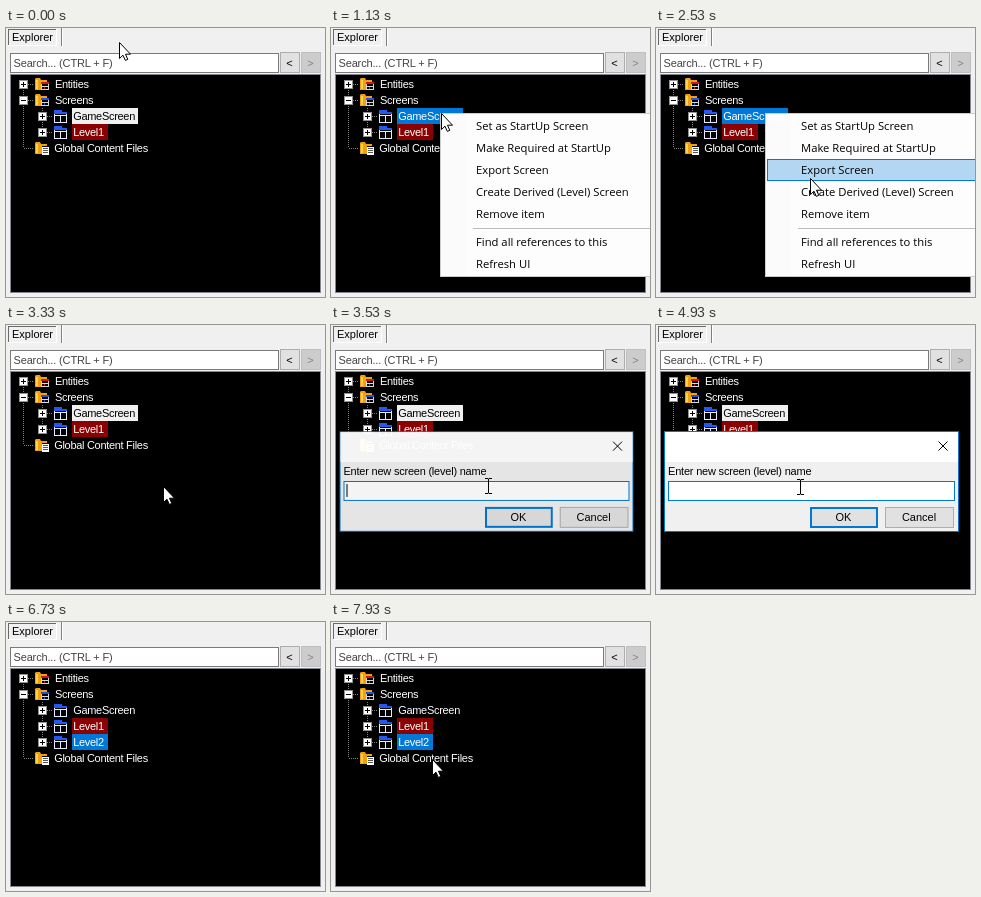
These frames come from a looping animation (319x269 px, 8 s). An HTML page:

```html
<!DOCTYPE html>
<html lang="en">
<head>
<meta charset="utf-8">
<title>Explorer</title>
<style>
html, body { margin: 0; width: 100%; height: 100%; overflow: hidden; background: #f0f0f0; }
svg { display: block; }
text { font: 11px "Liberation Sans", Arial, sans-serif; white-space: pre; }
.tight { letter-spacing: -.3px; }
.label { letter-spacing: -.2px; }
.input { letter-spacing: -.15px; }
.menu { font: 11.25px "Open Sans", "Noto Sans", sans-serif; }
.mid { text-anchor: middle; }
rect, .crisp { shape-rendering: crispEdges; }
.dialog rect { shape-rendering: auto; }
</style>
</head>
<body>
<svg id="stage" width="319" height="269" viewBox="0 0 319 269"></svg>
<script>
const stage = document.getElementById('stage');
const LOOP = 8000, STEP = 200 / 3;
const BLUE = '#0078d7', RED = '#8b0000';
const MENU = ['Set as StartUp Screen', 'Make Required at StartUp', 'Export Screen',
  'Create Derived (Level) Screen', 'Remove item', 'Find all references to this', 'Refresh UI'];
// Pointer keys: step, x, y
const PATH = [[0, 113, 14], [11, 110, 85], [23, 110, 85], [36, 150, 145], [38, 154, 150],
  [42, 157, 160], [48, 157, 160], [50, 157, 161], [53, 157, 161], [61, 144, 160],
  [63, 144, 162], [113, 144, 162], [119, 101, 137]];
const KEYS = [76, 79, 80, 81, 82, 87];        // steps at which a letter is typed
const CARET = [15, 21, 26, 31, 37, 41, 47];   // caret x after each letter

const fill = (x, y, w, h, c) => `<rect x="${x}" y="${y}" width="${w}" height="${h}" fill="${c}"/>`;
const box = (x, y, w, h, c, line, lw = 1) =>
  fill(x, y, w, h, line) + fill(x + lw, y + lw, w - 2 * lw, h - 2 * lw, c);
const text = (x, y, s, c = '#000', cls = '') =>
  `<text x="${x}" y="${y}" fill="${c}" class="${cls}">${s.replace(/</g, '&lt;')}</text>`;
const line = (d, c, extra = '') => `<path d="${d}" fill="none" stroke="${c}" ${extra}/>`;
const dots = d => line(d, '#808080', 'stroke-dasharray="1 1" class="crisp"');

function pointer(k) {
  const i = PATH.findIndex(p => p[0] >= k);
  if (i < 1) return PATH[i < 0 ? PATH.length - 1 : 0].slice(1);
  const [k0, x0, y0] = PATH[i - 1], [k1, x1, y1] = PATH[i];
  let u = (k - k0) / (k1 - k0);
  u *= u * (3 - 2 * u);
  return [Math.round(x0 + (x1 - x0) * u), Math.round(y0 + (y1 - y0) * u)];
}

const arrow = (x, y) => `<path transform="translate(${x} ${y})" fill="#fff" stroke="#000"
  d="M.5 .5V16.5L4 13.2 6.3 18.4 8.8 17.4 6.5 12.2H11.5Z"/>`;
const beam = (x, y) => line(`M${x - 3} ${y - 7.5}h3l.5 .5 .5 -.5h3M${x + .5} ${y - 7}v14` +
  `M${x - 3} ${y + 7.5}h3l.5 -.5 .5 .5h3`, '#000');

function expander(x, y, open) {
  return box(x - 4, y - 4, 9, 9, '#fff', '#919191') + fill(x - 2, y, 5, 1, '#000') +
    (open ? '' : fill(x, y - 2, 1, 5, '#000'));
}

function folder(y, kind) {
  const f = `<path d="M29 ${y - 5}l1 -1h4l1 2h6v2h-5v8h-7z" fill="#f0a010"/>` +
    fill(30, y - 4, 2, 9, '#ffd24a');
  if (kind === 'files')
    return f + fill(36, y - 1, 7, 8, '#fff') +
      [1, 3, 5].map(d => fill(37, y - 1 + d, 5, 1, '#555')).join('');
  const c = kind === 'entities' ? '#d01818' : '#2850e0';
  return f + box(35, y - 2, 8, 8, '#000', '#d8d8d8') + fill(35, y - 2, 8, 2, c) +
    fill(36, y + 2, 6, 1, '#d8d8d8') + fill(38, y + 3, 1, 2, c);
}

function screenIcon(y) {
  return box(48, y - 4, 13, 11, '#000', '#e8e8ff') + fill(48, y - 6, 8, 2, '#2458f0') +
    fill(48, y - 4, 13, 2, '#2458f0') + fill(49, y - 1, 11, 1, '#e8e8ff') +
    fill(54, y, 1, 6, '#e8e8ff');
}

function tree(k) {
  if (k >= 98 && k < 101) return '';
  const added = k >= 101, last = added ? 136 : 120;
  const picked = k >= 15 && k < 50;
  const rows = [['GameScreen', 66, added ? null : picked ? BLUE : '#f0f0f0', added || picked ? '#fff' : '#000'],
    ['Level1', 36, RED, '#fff']];
  if (added) rows.push(['Level2', 36, BLUE, '#fff']);
  let s = dots(`M17.5 56V${last}M18 56.5H28M18 72.5H28M18 ${last + .5}H28M36.5 80V${last - 16}`);
  s += expander(17, 56) + folder(56, 'entities') + text(49, 60, 'Entities', '#fff', 'tight');
  s += expander(17, 72, true) + folder(72, 'screens') + text(49, 76, 'Screens', '#fff', 'tight');
  rows.forEach(([name, w, back, ink], i) => {
    const y = 88 + 16 * i;
    s += dots(`M37 ${y + .5}H47`) + expander(36, y) + screenIcon(y);
    if (back) s += fill(66, y - 8, w, 16, back);
    s += text(67.2, y + 4, name, ink, 'tight');
  });
  return s + folder(last, 'files') + text(48.2, last + 4, 'Global Content Files', '#fff', 'tight');
}

function menu(x, y) {
  const hot = x >= 111 && y >= 87 ? Math.floor((y - 87) / 22) : -1;
  let s = box(109, 85, 230, 164, '#fdfdfd', '#ccc') + fill(111, 87, 24, 160, '#fbfbfb') +
    fill(142, 200, 177, 1, '#bdbdbd');
  MENU.forEach((name, i) => {
    const top = 87 + 22 * i + (i > 4 ? 6 : 0);
    if (i === hot) s += box(111, top, 226, 22, '#b3d7f3', BLUE);
    s += text(145, top + 15, name, '#000', 'menu');
  });
  return s;
}

function dialog(k) {
  let alpha = 1, scale = 1, dx = 0;
  if (k < 54) {
    alpha = [.35, .8, .955][k - 51];
    scale = 1 - .08 * (1 - alpha);
  } else if (k >= 98) {
    const u = (k * STEP - 6500) / 100;
    alpha = Math.max(.04, 1 - .7 * u);
    scale = 1 - .034 * u;
    dx = -u;
  }
  const typed = KEYS.filter(n => k >= n).length;
  const caret = k < 74 || k >= 76 && k < 95;
  return `<g class="dialog" opacity="${alpha}" transform="translate(${155.5 + dx} 156.5) scale(${scale}) translate(-155.5 -156.5)">` +
    box(8, 106, 295, 101, '#f0f0f0', BLUE) + fill(9, 107, 293, 30, '#fff') +
    line('M282.5 116.5l9 9m0 -9l-9 9', '#000') +
    text(12, 150, 'Enter new screen (level) name', '#000', 'label') +
    box(12, 156, 287, 20, '#fff', BLUE) +
    text(15, 170, 'Level2'.slice(0, typed), '#000', 'input') +
    (caret ? fill(CARET[typed], 159, 1, 13, '#000') : '') +
    box(154, 182, 68, 21, '#e1e1e1', BLUE, 2) + text(187.5, 196, 'OK', '#000', 'mid') +
    box(229, 182, 69, 21, '#e1e1e1', '#adadad') + text(263, 196, 'Cancel', '#000', 'mid') + '</g>';
}

function draw(k) {
  const [x, y] = pointer(k);
  const overSearch = y >= 25 && y < 45;
  const asking = k >= 51 && k < 101;
  let s = fill(0, 0, 319, 269, '#f0f0f0');
  s += fill(2, 1, 49, 17, '#fff') + fill(2, 1, 48, 16, '#696969') + fill(3, 2, 47, 15, '#f0f0f0');
  s += fill(55, 0, 1, 18, '#808080') + fill(56, 0, 1, 18, '#fff') + text(6, 13, 'Explorer');
  s += box(4, 25, 269, 20, '#fff', overSearch ? '#171717' : '#7a7a7a') +
    text(7.5, 39, 'Search... (CTRL + F)', '#444', 'input');
  s += box(274, 24, 20, 21, '#e1e1e1', '#adadad') + text(283.5, 39, '<', '#000', 'mid');
  s += box(295, 24, 20, 21, '#cccccc', '#bfbfbf') + text(304.5, 39, '>', '#838383', 'mid');
  s += box(4, 46, 311, 219, '#000', '#828790') + tree(k);
  if (k >= 17 && k < 49) s += menu(x, y);
  if (asking) s += dialog(k);
  if (k < 76 || k >= 114) s += overSearch || asking ? beam(x, y) : arrow(x, y);
  stage.innerHTML = s;
}

let shown = -1;
function tick() {
  const k = Math.floor((performance.now() % LOOP + 3.4) / STEP) % 120;
  if (k !== shown) draw(shown = k);
  requestAnimationFrame(tick);
}
tick();
</script>
</body>
</html>
```
